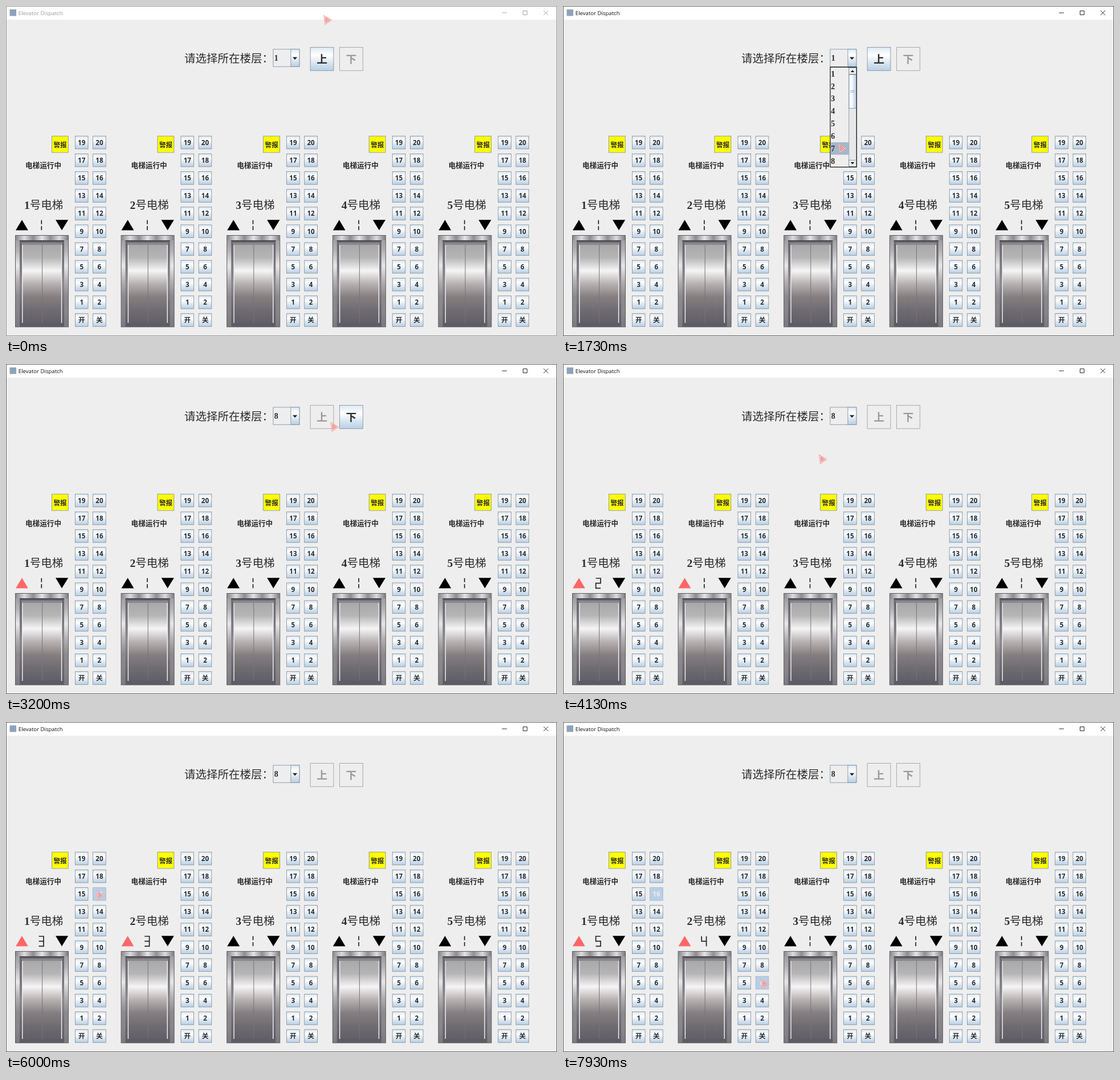
An HTML page that plays this animation: 967 px wide and 579 px high, repeating every 8000 ms.

```html
<!DOCTYPE html>
<html lang="zh-CN">
<head>
<meta charset="utf-8">
<title>Elevator Dispatch</title>
<style>
html, body { margin: 0; width: 100%; height: 100%; overflow: hidden; background: #eee; }
svg { display: block; }
text { fill: #2b2b2b; }
.ui { font: bold 11.6px "Open Sans", "Noto Sans CJK SC", "Noto Sans CJK", sans-serif; }
.cjk { font-family: "Noto Sans CJK SC", "Noto Sans CJK", sans-serif; font-weight: 700; }
.num { font: bold 14px "Liberation Serif", serif; }
.head { font: 19.5px "Noto Sans CJK SC", "Noto Sans CJK", sans-serif; }
.head tspan { font-family: "Liberation Serif", serif; font-weight: 700; }
.mid { text-anchor: middle; }
.edge { stroke: #7a8a99; stroke-width: .8; }
</style>
</head>
<body>
<svg id="stage" width="967" height="579" viewBox="0 0 967 579"></svg>
<script>
const LOOP = 8000, PITCH = 185.6, ROW = 21.85, FLOOR_MS = 1030;
const EV = { activate: 1000, open: 1070, pick: 2200, up: 3070, down: 3940, call16: 6000, call6: 7870 };
// pointer moves: start time, end time, x, y
const HOME = [564, 24];
const MOVES = [
  [70, 600, 541, 104], [600, 930, 513, 91], [1330, 1950, 486, 272], [2200, 2730, 558, 97],
  [2870, 3200, 576, 110], [3200, 3470, 604, 97], [3870, 5270, 165, 303],
  [6000, 6730, 350, 430], [6870, 7330, 354, 433], [7470, 7930, 354, 459]
];

const svg = document.getElementById('stage');
const $ = id => document.getElementById(id);
const rect = (x, y, w, h, fill, more = '') =>
  `<rect x="${x}" y="${y}" width="${w}" height="${h}" fill="${fill}" ${more}/>`;
// bordered box whose line lies inside the given bounds
const box = (x, y, w, h, fill) => rect(x + .4, y + .4, w - .8, h - .8, fill, 'class="edge"');
const text = (x, y, s, cls, more = '') => `<text x="${x}" y="${y}" class="${cls}" ${more}>${s}</text>`;
const path = (d, fill, more = '') => `<path d="${d}" fill="${fill}" ${more}/>`;
const line = (d, color, width) => path(d, 'none', `stroke="${color}" stroke-width="${width}"`);

// evenly spaced colours
function grad(id, colors, across) {
  const list = colors.split(' ');
  return `<linearGradient id="${id}" x2="${+!!across}" y2="${+!across}">` +
    list.map((c, i) => `<stop offset="${i / (list.length - 1)}" stop-color="${c}"/>`).join('') +
    '</linearGradient>';
}

const OCEAN = '#dde8f3 #fff #dae6f1 #b8cfe5';
const defs = '<defs>' + grad('ocean', OCEAN) + grad('oceanX', OCEAN, true) +
  grad('door', '#a8a7a9 #b6b5b6 #f6f5f6 #b7b2b2 #867f81 #6f6c71 #605f67') +
  grad('frame', '#98969a #b4b2b5 #e8e7e8 #b4b1b4 #8d8a8e #88868b #7c7a80') +
  grad('lintel', '#8a888c #dcdbdd #8e8c90 #e4e3e5 #918f93 #dcdbdd #7e7c81', true) +
  grad('jamb', '#66646b #77757b #8b898e #6d6b71 #5c5a62') + '</defs>';

function button(x, y, label, id) {
  return `<g id="${id}">` + box(x, y, 23.4, 23.4, 'url(#ocean)') +
    text(x + 11.7, y + 16, label, 'ui mid') + '</g>';
}

function bigButton(x, label, id) {
  return `<g id="${id}">` + box(x, 72.1, 41.6, 41.6, 'url(#ocean)') +
    text(x + 20.8, 100, label, 'cjk mid', 'font-size="18.7"') + '</g>';
}

function doors() {
  return rect(16.5, 402.5, 93, 160.5, 'url(#frame)', 'stroke="#5b5a5e"') +
    rect(17, 403, 92, 8, 'url(#lintel)') +
    rect(24, 411, 78, 152, 'url(#jamb)') +
    rect(24, 411, 78, 2, '#4b4a50') +
    rect(27, 415, 72, 3, '#89878d') +
    rect(29, 418.5, 69, 137.5, 'url(#door)') +
    line('M28.8 419V556M97.6 419V556', '#f4f3f4', 1.4) +
    line('M63.6 419V556', '#77757a', 1);
}

function elevator(i) {
  let s = `<g transform="translate(${(PITCH * i).toFixed(1)})">` +
    box(80, 227.8, 29.6, 29.6, '#ff0') +
    text(95, 247.8, '警报', 'ui mid') +
    text(65.5, 284.3, '电梯运行中', 'cjk mid', 'font-size="12.6"') +
    text(32, 355.5, `<tspan>${i + 1}</tspan>号电梯`, 'head') +
    path('M28 375.3L38.8 393.6H17Z', '#000', `id="lamp${i}"`) +
    path('M87 375.2H109.2L98 393.6Z', '#000') +
    path('', 'none', `id="digit${i}" stroke="#222" stroke-width="1.7"`) + doors();
  for (let r = 0; r < 11; r++) {
    const y = 227.8 + 31.15 * r, n = 19 - 2 * r;
    const pair = r < 10 ? [n, n + 1] : ['开', '关'];
    pair.forEach((label, c) => s += button(121 + 31.2 * c, y, label, `b${i}-${label}`));
  }
  return s + '</g>';
}

function titleBar() {
  return rect(0, 0, 967, 24, '#fff') + rect(6.5, 6, 11.5, 11.5, '#8da3ba') +
    text(21.8, 15.8, 'Elevator Dispatch', '', 'id="title" font-size="9.6" font-family="Open Sans, sans-serif"') +
    path('M870.5 12H879M907.5 8.5H914.5V15.5H907.5ZM943.5 8L951.5 16M951.5 8L943.5 16',
      'none', 'id="controls" stroke-width=".9"') +
    rect(.5, .5, 966, 578, 'none', 'id="border"');
}

function picker() {
  return text(313, 99, '请选择所在楼层：', 'head') +
    box(468.5, 75.5, 46.8, 31.2, '#eee') + box(499.5, 75.5, 15.8, 31.2, 'url(#ocean)') +
    path('M503 89.8H511.2L507.1 94.2Z', '#222') +
    text(470.8, 95.7, '1', 'num', 'id="chosen"') +
    bigButton(533.7, '上', 'goUp') + bigButton(585.1, '下', 'goDown');
}

function popup() {
  let s = '<g id="popup">' + rect(469, 107.3, 46.3, 175.3, '#eee', 'stroke="#111" stroke-width="1.2"') +
    rect(469.6, 108, 31.6, ROW, '#a3b8cc', 'id="hover"');
  for (let k = 0; k < 8; k++) s += text(470.2, 123.7 + ROW * k, k + 1, 'num');
  return s + box(501.4, 108, 13.4, 174, '#e8e8e8') + box(501.4, 108, 13.4, 12, '#eee') +
    box(501.4, 270, 13.4, 12, '#eee') + box(501.4, 120, 13.4, 60, 'url(#oceanX)') +
    line('M504.4 148.5H511.6M504.4 151H511.6', '#7a96b3', .8) +
    path('M504.6 116H511.4L508 112.4ZM504.6 274H511.4L508 277.6Z', '#111') + '</g>';
}

const cursor = '<g id="cursor">' +
  path('M-6 -7.5L7.5 .8L-4 8.5Z', '#ffd3d3', 'fill-opacity=".65" stroke="#f79a9a" stroke-linejoin="round"') +
  path('M-3 -3.6L3.6 .8L-2.2 4.4Z', '#fff0f0', 'fill-opacity=".7" stroke="#e8605f"') +
  '<circle cx="-.5" cy=".6" r="1" fill="#d94c4c"/></g>';

svg.innerHTML = defs + rect(0, 0, 967, 579, '#eee') + titleBar() + picker() +
  [0, 1, 2, 3, 4].map(elevator).join('') + popup() + cursor;

// digits as strokes over a grid of nodes, two columns by three rows
const STROKES = { 2: ['013245'], 3: ['01354', '23'], 4: ['0231', '35'], 5: ['102354'] };
const node = k => `${57.6 + 8.4 * (k % 2)} ${376 + 8.7 * (k >> 1)}`;
const digit = n => n < 2 ? 'M62.3 375.8V382.8M62.3 386.3V393.3'
  : STROKES[n].map(s => 'M' + [...s].map(node).join('L')).join('');

function attr(id, values) {
  for (const k in values) $(id).setAttribute(k, values[k]);
}

function paintButton(id, fill, ink, edge) {
  const [face, label] = $(id).children;
  face.setAttribute('fill', fill);
  face.style.stroke = edge;
  label.style.fill = ink;
}

function setEnabled(id, on) {
  if (on) paintButton(id, 'url(#ocean)', '#2b2b2b', '#7a8a99');
  else paintButton(id, '#eee', '#999', '#999');
}

function setCalled(id, on) {
  if (on) paintButton(id, '#b8cfe5', '#eee', '#9fb4c9');
  else setEnabled(id, true);
}

function pointer(t) {
  let [x, y] = HOME;
  for (const [from, to, tx, ty] of MOVES) {
    const left = 1 - Math.min(1, Math.max(0, (t - from) / (to - from)));
    const p = 1 - left * left;
    x += (tx - x) * p;
    y += (ty - y) * p;
  }
  return [x, y];
}

function draw(t) {
  const [x, y] = pointer(t);
  attr('cursor', { transform: `translate(${x.toFixed(2)} ${y.toFixed(2)})` });

  const active = t >= EV.activate;
  $('title').style.fill = active ? '#111' : '#999';
  attr('controls', { stroke: active ? '#111' : '#999' });
  attr('border', { stroke: active ? '#666' : '#999' });

  const open = t >= EV.open && t < EV.pick;
  attr('popup', { visibility: open ? 'visible' : 'hidden' });
  const row = Math.max(0, Math.min(7, Math.floor((y - 108) / ROW)));
  attr('hover', { y: 108 + ROW * row });
  $('chosen').textContent = t < EV.pick ? 1 : 8;

  setEnabled('goUp', t < EV.up);
  setEnabled('goDown', t >= EV.pick && t < EV.down);
  setCalled('b0-16', t >= EV.call16);
  setCalled('b1-6', t >= EV.call6);

  [EV.up, EV.down, LOOP, LOOP, LOOP].forEach((call, i) => {
    const climbed = Math.max(0, Math.floor((t - call) / FLOOR_MS));
    attr('digit' + i, { d: digit(1 + climbed) });
    attr('lamp' + i, { fill: t >= call ? '#f66' : '#000' });
  });
}

const start = performance.now();
function tick() {
  draw((performance.now() - start) % LOOP);
  requestAnimationFrame(tick);
}
draw(0);
requestAnimationFrame(tick);
</script>
</body>
</html>
```
